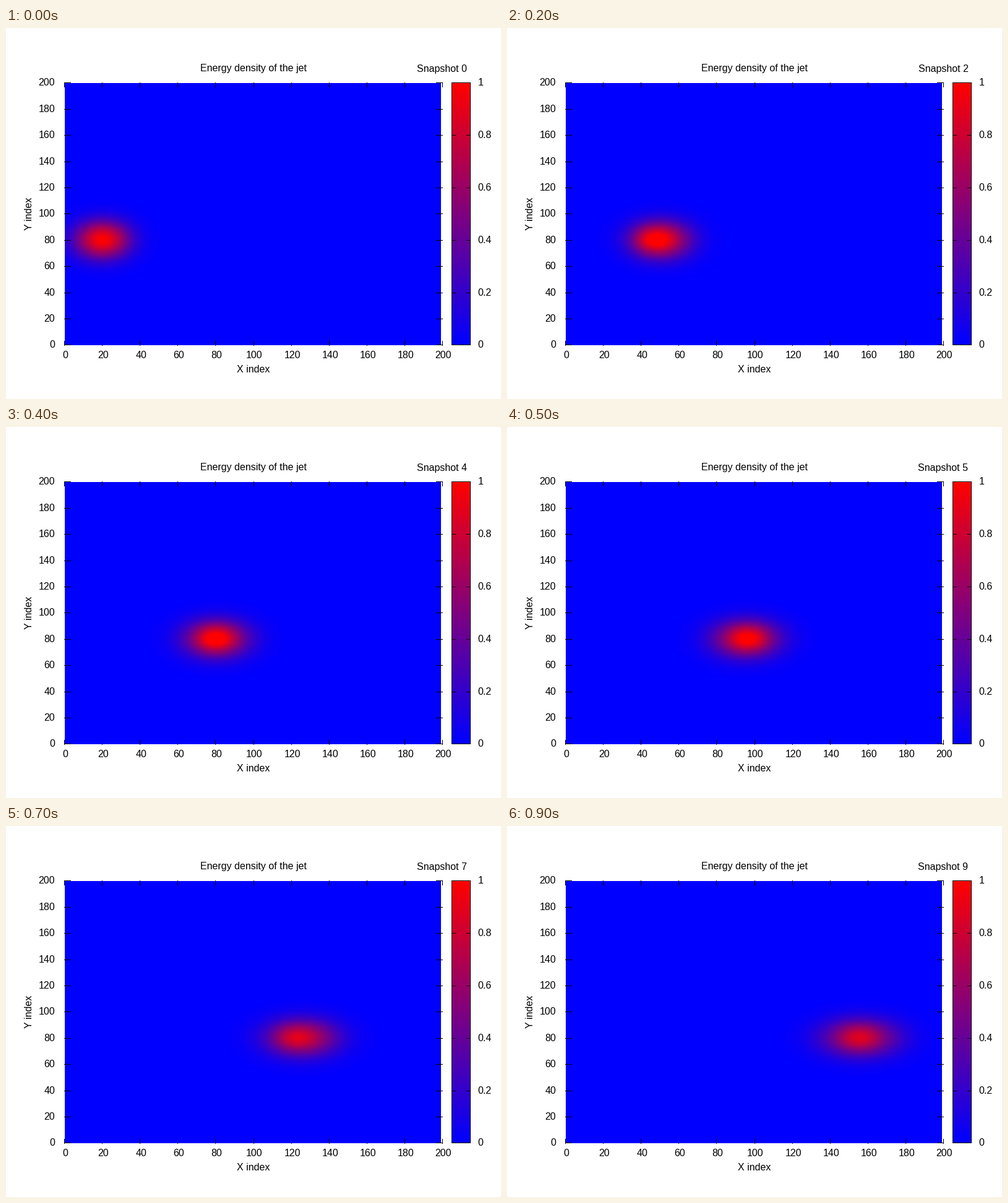
A matplotlib script for the animation above (1 s loop, 800 by 600 pixels).

```python
import math

import matplotlib.pyplot as plt
import numpy as np
from matplotlib.animation import FuncAnimation
from matplotlib.colors import LinearSegmentedColormap

WIDTH, HEIGHT, DPI = 800, 600, 100
PX = 72 / DPI
FRAMES = 10

plt.rcParams["font.family"] = "Liberation Sans"
plt.rcParams["font.size"] = 16 * PX

fig = plt.figure(figsize=(WIDTH / DPI, HEIGHT / DPI), dpi=DPI, facecolor="white")
ax = fig.add_axes([0, 0, 1, 1])
palette = LinearSegmentedColormap.from_list("heat", ["blue", "red"], N=128)
grid_x, grid_y = np.meshgrid(np.arange(199) + 0.5, np.arange(200))


def bell(x, sigma_x, sigma_y):
    return np.exp(-((grid_x - x) / sigma_x) ** 2 / 2 - ((grid_y - 80) / sigma_y) ** 2 / 2)


def density(i):
    """A pulse that drifts and spreads, with a small core swinging inside it."""
    center = 20 + 15.1 * i
    spread = math.sqrt(1 + 0.11 * i)
    swing = 2 * ((i - 2) % 5) - 5
    core = 0.27 * math.sqrt(abs(math.sin(math.pi * i / 8)))
    return bell(center, 10 * spread, 10) / spread + core * bell(center + swing, 6.5, 6.5)


def heat(values, extent):
    return ax.imshow(values, cmap=palette, vmin=0, vmax=1, origin="lower",
                     extent=extent, aspect="auto", interpolation="nearest")


def line(x0, y0, x1, y1):
    ax.plot([x0, x1], [y0, y1], color="black", lw=PX, solid_capstyle="butt",
            snap=False, zorder=3)


def label(x, y, text, ha="center", **kw):
    return ax.text(x, y, text, ha=ha, va="baseline", color="black", **kw)


def row(fraction):
    return math.floor(512.9 - 424 * fraction) + 0.5


field = heat(density(0), (95, 703, 513, 89))
heat(np.linspace(0, 1, 128)[:, None], (721, 750, 512, 89))

for k in range(11):
    value = str(20 * k)
    y = row(k / 10)
    line(94, y, 105, y)
    line(695, y, 706, y)
    label(79, y + 4.5, value, "right")

    exact_x = 94.5 + 61.1 * k
    x = math.floor(exact_x) + 0.5
    reach = 2 if k % 5 in (1, 3) else 8
    line(x, 514 - reach, x, 514)
    line(x, 88, x, 96)
    label(exact_x + 1.5, 534, value)

for k in range(6):
    y = row(k / 5)
    line(720, y, 727, y)
    line(744, y, 751, y)
    label(762.5, y + 4.5, f"{k / 5:g}", "left")

for x in (720.5, 750.5):
    line(x, 88, x, 513)
for y in (88.5, 512.5):
    line(720, y, 751, y)

label(400.5, 70, "Energy density of the jet")
label(399.5, 557, "X index")
label(42, 300, "Y index", rotation=90, rotation_mode="anchor")
counter = label(745.5, 71, "Snapshot 0", "right")

ax.set_xlim(0, WIDTH)
ax.set_ylim(HEIGHT, 0)
ax.axis("off")


def update(i):
    field.set_data(density(i))
    counter.set_text(f"Snapshot {i}")
    return field, counter


anim = FuncAnimation(fig, update, frames=FRAMES, interval=100, repeat=True, repeat_delay=0)
plt.show()
```
